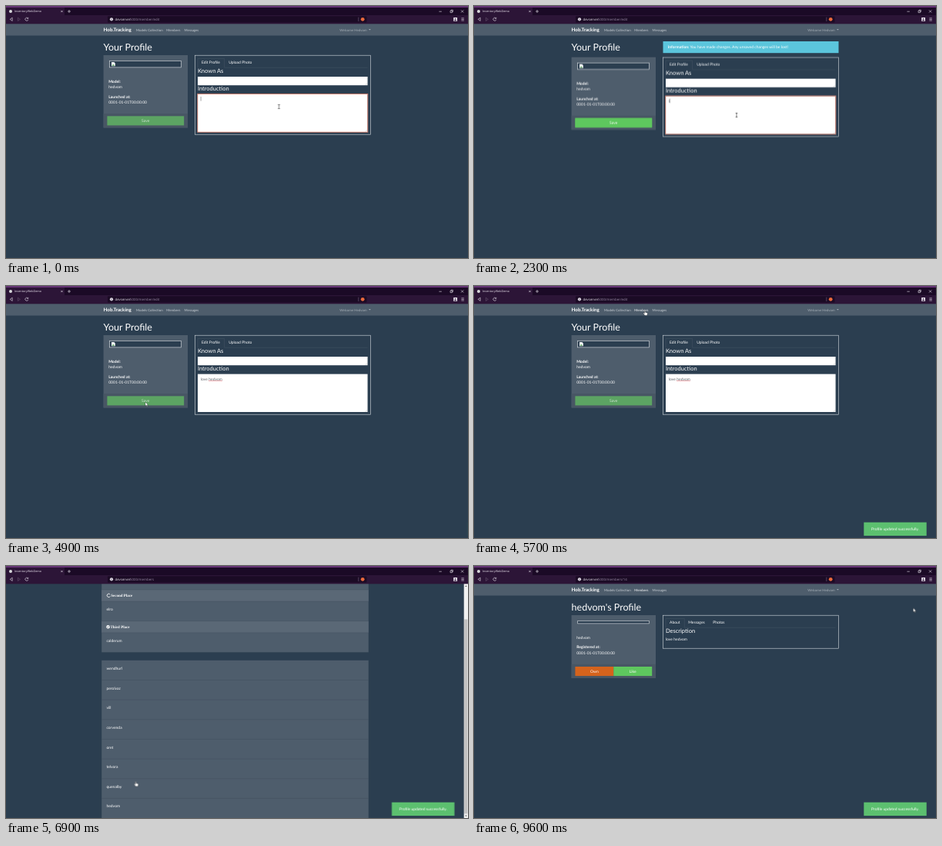
An HTML page that plays this animation: 600x328 px, repeating every 9700 ms.

```html
<!DOCTYPE html>
<html lang="en">
<head>
<meta charset="utf-8">
<title>Profile update</title>
<style>
html, body { margin: 0; width: 100%; height: 100%; overflow: hidden; background: #2b3e50; }
svg { display: block; width: 100vw; height: 100vh; }
text { font-family: Lato, sans-serif; font-size: 5px; text-rendering: geometricPrecision; white-space: pre; }
.page { fill: #fff; }
.bold { font-weight: 700; }
.h1 { font-size: 12.5px; }
.h4 { font-size: 7.5px; }
.link { font-size: 4.375px; }
.mid { text-anchor: middle; }
.place { font: 700 5px "Liberation Serif", serif; }
.ui { font: 3.75px "Open Sans", sans-serif; fill: #e9e4ee; }
.url { font-size: 4.375px; }
.dim { fill: #9a8ca6; }
.card { fill: #4e5d6c; }
.foot { fill: #485664; }
.head { fill: #5a6876; }
.frame { fill: none; stroke: #d5dbe0; stroke-width: .6; }
.thumb { fill: #2b3e50; stroke: #dee2e6; stroke-width: .6; }
.rule { fill: none; stroke: #4e5d6c; stroke-width: .4; }
.green { fill: #5ec75e; }
.icon { fill: none; stroke: #e9e4ee; stroke-width: .6; }

/* every part runs on one 9.7 s clock */
.edit, .members, .profile, .dirty, .clean, .focus, .blurred, .shift, .caret, .ibeam, .arrow, .hand, .typing, .hover {
  animation: 9.7s step-end infinite;
}
.edit { animation-name: edit; }
.members { animation-name: members; }
.profile { animation-name: profile; }
.dirty { animation-name: dirty; }
.clean { animation-name: clean; }
.focus { animation-name: focus; }
.blurred { animation-name: blurred; }
.shift { animation-name: shift; }
.caret { animation-name: caret; }
.ibeam { animation-name: ibeam; }
.arrow { animation-name: arrow; }
.hand { animation-name: hand; }
.typing { animation-name: typing; }
.hover { animation-name: hover; }
.scroll { animation: scroll 9.7s linear infinite; }
.toast { animation: toast 9.7s step-end infinite; }
.pointer { animation: pointer 9.7s linear infinite; }

@keyframes edit { 0% { opacity: 1 } 62.88% { opacity: 0 } }
@keyframes members { 0% { opacity: 0 } 62.88% { opacity: 1 } 76.28% { opacity: 0 } }
@keyframes profile { 0% { opacity: 0 } 76.28% { opacity: 1 } }
@keyframes dirty { 0% { opacity: 0 } 23.7% { opacity: 1 } 50.5% { opacity: 0 } }
@keyframes clean { 0% { opacity: 1 } 23.7% { opacity: 0 } 50.5% { opacity: 1 } }
@keyframes focus { 0% { opacity: 1 } 50.5% { opacity: 0 } }
@keyframes blurred { 0% { opacity: 0 } 50.5% { opacity: 1 } }
@keyframes shift { 0% { transform: none } 23.7% { transform: translateY(2.6px) } 50.5% { transform: none } }
@keyframes hover { 0% { fill: #c9cfd5 } 56.7% { fill: #fff } }
@keyframes caret {
  0% { opacity: 1 } 5.15% { opacity: 0 } 10.3% { opacity: 1 } 15.46% { opacity: 0 }
  19.5% { opacity: 1 } 44.3% { opacity: 0 } 48.4% { opacity: 1 }
}
@keyframes typing {
  0% { transform: none }
  23.7% { transform: translateX(1.2px) }
  25.76% { transform: translateX(4px) }
  27.82% { transform: translateX(9.2px) }
  30.92% { transform: translateX(10.2px) }
  31.95% { transform: translateX(13px) }
  32.98% { transform: translateX(15.6px) }
  35.04% { transform: translateX(18.4px) }
  37.1% { transform: translateX(20.9px) }
  38.13% { transform: translateX(23.8px) }
  39.16% { transform: translateX(28.2px) }
}
@keyframes scroll {
  0%, 65.97% { transform: translateY(var(--from)); animation-timing-function: ease-in-out }
  70.1%, 100% { transform: none }
}
@keyframes toast {
  0% { transform: translateX(96px); opacity: 0 }
  50.5% { transform: translateX(96px); opacity: 0; animation-timing-function: cubic-bezier(.175, .885, .32, 1.275) }
  53.6% { transform: none; opacity: 1 }
  62.88% { transform: translateX(-5.3px) }
  76.28% { transform: none }
}
@keyframes ibeam { 0% { opacity: 1 } 47.3% { opacity: 0 } }
@keyframes arrow { 0% { opacity: 0 } 47.3% { opacity: 1 } 49% { opacity: 0 } 50.5% { opacity: 1 } 56.7% { opacity: 0 } 76.28% { opacity: 1 } }
@keyframes hand { 0% { opacity: 0 } 49% { opacity: 1 } 50.5% { opacity: 0 } 56.7% { opacity: 1 } 76.28% { opacity: 0 } }
@keyframes pointer {
  0%, 1.03% { transform: translate(354.5px, 131px) }
  10.3%, 44.3% { transform: translate(341px, 142px) }
  49.48%, 53.6% { transform: translate(181px, 151px) }
  57.73%, 63.4% { transform: translate(222px, 32px) }
  70.1%, 73.2% { transform: translate(168.5px, 280.5px) }
  75.26%, 79.38% { transform: translate(161px, 312.2px) }
  82.47% { transform: translate(194.5px, 259.5px) }
  86.6%, 87.63% { transform: translate(317.5px, 60px) }
  89.7% { transform: translate(390px, 66px) }
  93.8% { transform: translate(592px, 51px) }
  97.9% { transform: translate(570px, 54px) }
  98.9%, 100% { transform: translate(570.5px, 54.7px) }
}
</style>
</head>
<body>
<svg viewBox="0 0 600 328">
  <defs>
    <g id="nav">
      <rect class="card" x="-10" y="23" width="625" height="15.5"/>
      <text class="bold" x="126.6" y="33.2" style="font-size:6.25px" fill="#fff">Hob.Tracking</text>
      <text class="link" x="169" y="32.7" fill="#c9cfd5">Models Collection</text>
      <text class="link" x="208.3" y="32.7">Members</text>
      <text class="link" x="231.6" y="32.7" fill="#c9cfd5">Messages</text>
      <text class="link" x="433.2" y="32.7" fill="#a5aeb6">Welcome Hedvom</text>
      <path d="M471 30h2.8l-1.4 1.5z" fill="#a5aeb6"/>
    </g>
    <path id="grip" d="M-2.2 0l2.2-2.2M-1 0l1-1" stroke="#888" stroke-width=".3"/>
  </defs>

  <rect width="600" height="328" fill="#2b3e50"/>

  <g class="page edit">
    <use href="#nav" class="hover"/>
    <text class="h1" x="126.6" y="58">Your Profile</text>
    <g class="dirty">
      <rect x="245.5" y="46" width="228" height="15.2" fill="#5bc5dc"/>
      <text x="251.8" y="55.3"><tspan class="bold">Information:</tspan> You have made changes. Any unsaved changes will be lost!</text>
    </g>
    <g class="shift">
      <rect class="card" x="126.6" y="64" width="109.4" height="94.4"/>
      <rect class="foot" x="126.6" y="140" width="109.4" height="18.4"/>
      <rect class="thumb" x="134.7" y="71.5" width="92.6" height="8.4"/>
      <path d="M137 73h3.4l1.4 1.4v3.9h-4.8z" fill="#f4f6f8"/>
      <path d="M137.5 77.7l1.6-2 2.2 2z" fill="#58a55a"/>
      <text class="bold" x="133.2" y="99.5">Model:</text>
      <text x="133.2" y="106.9">hedvom</text>
      <text class="bold" x="133.2" y="119.5">Launched at:</text>
      <text x="133.2" y="127">0001-01-01T00:00:00</text>
      <rect x="131.4" y="143.3" width="99.8" height="12.1" fill="#5ca463"/>
      <text class="mid clean" x="181.2" y="151.2" fill="#cfe3d2">Save</text>
      <g class="dirty">
        <rect class="green" x="131.4" y="143.3" width="99.8" height="12.1"/>
        <text class="mid" x="181.2" y="151.2">Save</text>
      </g>

      <rect class="frame" x="245.6" y="64.2" width="227.7" height="103"/>
      <path class="rule" d="M249 80.2V68.4h34.6v11.8H469.6"/>
      <text x="254" y="75.4">Edit Profile</text>
      <text x="289.2" y="75.4">Upload Photo</text>
      <text class="h4" x="248.9" y="87.4">Known As</text>
      <rect x="249" y="92" width="220.6" height="11.2"/>
      <use href="#grip" x="469" y="102.6"/>
      <text class="h4" x="248.9" y="110.4">Introduction</text>
      <rect x="249" y="114.6" width="220.6" height="49.4"/>
      <use href="#grip" x="469" y="163.4"/>
      <text x="252.9" y="122.5" fill="#5a5f66">love hedvom</text>
      <path class="blurred" d="M263 123.6h18" stroke="#e0525c" stroke-width=".5"/>
      <g class="typing">
        <rect x="252.9" y="116.5" width="40" height="9"/>
        <g class="focus"><rect class="caret" x="252.8" y="118" width=".5" height="5.6" fill="#444"/></g>
      </g>
      <rect class="focus" x="248.8" y="114.4" width="221" height="49.8" fill="none" stroke="#d9826f" stroke-width=".9"/>
    </g>
  </g>

  <g class="page members">
    <g class="scroll" style="--from:50px">
      <use href="#nav" x="-2.66" y="-50"/>
      <rect class="card" x="124.2" y="-10" width="346.6" height="122.3"/>
      <rect class="head" x="124.2" y="-10" width="346.6" height="15.3"/>
      <rect class="head" x="124.2" y="30.8" width="346.6" height="15.3"/>
      <rect class="head" x="124.2" y="71.6" width="346.6" height="15.3"/>
      <path class="rule" style="stroke:#3d4b59" d="M124.2 5.3h346.6M124.2 30.8h346.6M124.2 46.1h346.6M124.2 71.6h346.6M124.2 86.9h346.6"/>
      <circle cx="132.6" cy="-2.4" r="2.2"/>
      <text class="place" x="135.4" y="-.7">First Place</text>
      <path d="M135 36.8a2.2 2.2 0 1 0 .4 2.6" fill="none" stroke="#fff" stroke-width=".8"/>
      <text class="place" x="136.2" y="40.1">Second Place</text>
      <circle cx="132.6" cy="79.2" r="2.3"/>
      <path d="M131.3 79.2l1 1 1.7-2" fill="none" stroke="#4e5d6c" stroke-width=".7"/>
      <text class="place" x="135.4" y="80.9">Third Place</text>
      <text x="130.4" y="17.2">orvel</text>
      <text x="130.4" y="58">elro</text>
      <text x="130.4" y="98.8">calderum</text>
      <rect class="card" x="124.2" y="122.8" width="346.6" height="205.2"/>
      <path class="rule" style="stroke:#3d4b59" d="M124.2 148.5h346.6m-346.6 25.65h346.6m-346.6 25.65h346.6m-346.6 25.65h346.6m-346.6 25.65h346.6m-346.6 25.65h346.6m-346.6 25.65h346.6"/>
      <text y="134.9"><tspan x="130.4">wendhurl</tspan><tspan x="130.4" dy="25.65">perolvaz</tspan><tspan x="130.4" dy="25.65">vill</tspan><tspan x="130.4" dy="25.65">corvenda</tspan><tspan x="130.4" dy="25.65">oret</tspan><tspan x="130.4" dy="25.65">telvora</tspan><tspan x="130.4" dy="25.65">quenalby</tspan><tspan x="130.4" dy="25.65">hedvom</tspan></text>
    </g>
    <rect x="594.7" y="23" width="5.3" height="305" fill="#f1f1f1"/>
    <rect class="scroll" style="--from:-41px" x="595.2" y="69.4" width="4.3" height="253" fill="#c1c1c1"/>
    <path d="M596.1 26.9h2.6l-1.3-1.6zM596.1 324.6h2.6l-1.3 1.6z" fill="#666"/>
  </g>

  <g class="page profile">
    <use href="#nav"/>
    <text class="h1" x="126.6" y="58">hedvom's Profile</text>
    <rect class="card" x="126.6" y="64" width="109.4" height="82"/>
    <rect class="foot" x="126.6" y="127.8" width="109.4" height="18.2"/>
    <rect class="thumb" x="134.7" y="71.5" width="92.6" height="3.4"/>
    <text x="133.2" y="94.5">hedvom</text>
    <text class="bold" x="133.2" y="107">Registered at:</text>
    <text x="133.2" y="114.5">0001-01-01T00:00:00</text>
    <rect x="131.4" y="131" width="49.9" height="12.1" fill="#d5631c"/>
    <rect class="green" x="181.3" y="131" width="49.9" height="12.1"/>
    <text class="mid" x="156.4" y="138.8">Own</text>
    <text class="mid" x="206.2" y="138.8">Like</text>
    <rect class="frame" x="245.6" y="64.2" width="227.7" height="43"/>
    <path class="rule" d="M249 80.2V68.4h24.3v11.8H469.6"/>
    <text x="254" y="75.4">About</text>
    <text x="278.3" y="75.4">Messages</text>
    <text x="310.2" y="75.4">Photos</text>
    <text class="h4" x="248.9" y="87.4">Description</text>
    <text x="248.9" y="97.2">love hedvom</text>
  </g>

  <g class="toast">
    <rect x="506.3" y="307.6" width="81.4" height="17.5" fill="#5cc06f"/>
    <text class="mid" x="547" y="318.2" fill="#fff">Profile updated successfully.</text>
  </g>

  <!-- browser window -->
  <rect width="600" height="23.3" fill="#2c1537"/>
  <rect x="76" width="524" height="12" fill="#1b0a26"/>
  <rect width="600" height="2" fill="#643374"/>
  <circle cx="6" cy="7" r="2" fill="#d8d8dc"/>
  <text class="ui" x="11" y="8.4">InventoryWebDemo</text>
  <path class="icon" d="M71.4 5.9l2.2 2.2m0-2.2l-2.2 2.2M80 7h4m-2-2v4M562.4 7.2h3.4M591 5.4l3.2 3.2m0-3.2l-3.2 3.2M577 6.2h2.4v2.4H577zM578 6v-.8h2.4v2.4h-.8"/>
  <path class="icon" d="M8.2 15.2v4.2l-3-2.1z"/>
  <path class="icon" opacity=".3" d="M15.4 15.2v4.2l3-2.1z"/>
  <path class="icon" d="M28.4 15.9a2 2 0 1 0 .4 1.9M28.8 14.8v1.6h-1.6"/>
  <rect x="132" y="13.2" width="336.5" height="8.4" rx="1" fill="#1b0b25"/>
  <circle cx="137" cy="17.3" r="2.1" fill="#e9e4ee"/>
  <path d="M137 17v1.4M137 15.9v.5" stroke="#1b0b25" stroke-width=".6"/>
  <text class="ui url" x="141.6" y="18.9">devserver</text>
  <text class="ui url dim edit" x="159.8" y="18.9">:5000/member/edit</text>
  <text class="ui url dim members" x="159.8" y="18.9">:5000/members</text>
  <text class="ui url dim profile" x="159.8" y="18.9">:5000/members/14</text>
  <path d="M457.8 14.6v5.4" stroke="#8a7796" stroke-width=".5"/>
  <circle cx="463.2" cy="17.3" r="2.4" fill="#ea6a3c"/>
  <rect x="581.2" y="15" width="4.8" height="4.8" fill="#e9e4ee"/>
  <path d="M582.2 19.3a1.4 1.4 0 0 1 2.8 0z" fill="#2c1537"/>
  <circle cx="583.6" cy="16.8" r=".8" fill="#2c1537"/>
  <path class="icon" d="M591.4 15.8h3.4m-3.4 1.6h3.4m-3.4 1.6h3.4"/>

  <g class="pointer">
    <path class="ibeam" d="M-1.3-2.6h2.6M-1.3 2.6h2.6M0-2.6v5.2" fill="none" stroke="#222" stroke-width=".6"/>
    <path class="arrow" d="M0 0v5l1.2-1 .8 1.8.9-.4-.8-1.7h1.5z" fill="#fff" stroke="#111" stroke-width=".3"/>
    <path class="hand" d="M-.5.3q.5-.6 1 0v2l2.3.6q.6.2.5 1L2.8 6.300H-.1L-2 3.700q0-.7.7-.6l.8.7z" fill="#fff" stroke="#111" stroke-width=".3"/>
  </g>
</svg>
</body>
</html>
```
